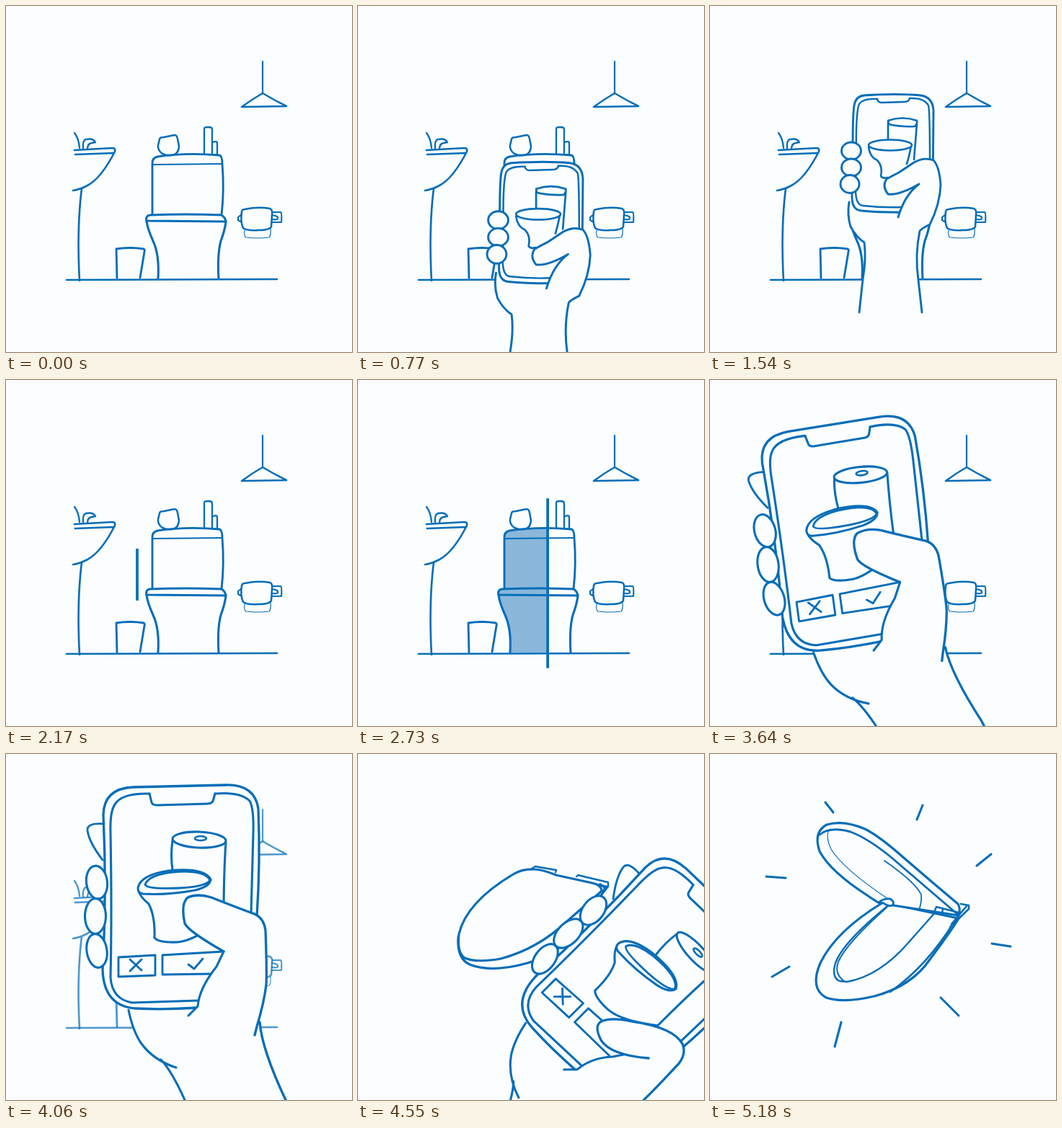
An HTML page with a canvas for the animation above (5.81 s loop, 480 by 480 pixels).

```html
<!DOCTYPE html>
<html lang="en">
<head>
<meta charset="utf-8">
<title>Bathroom scan</title>
<style>
html, body { margin: 0; width: 100%; height: 100%; overflow: hidden; background: #fcfdff; }
canvas { display: block; width: 100vw; height: 100vh; }
</style>
</head>
<body>
<canvas id="stage" width="480" height="480"></canvas>
<script>
const ctx = document.getElementById('stage').getContext('2d');
const PAPER = '#fcfdff', INK = '#046db8', TINT = '#8ab7da';
const STEP = 70, STEPS = 83, WEIGHT = 1.1;

const clamp = v => Math.min(1, Math.max(0, v));
const span = (n, a, b) => clamp((n - a) / (b - a));
const easeOut = k => 1 - (1 - k) ** 2;
const smooth = k => k * k * (3 - 2 * k);
const lerp = (a, b, k) => a + (b - a) * k;
const mix = (a, b, k) => a.map((v, i) => lerp(v, b[i], k));

function line(d, width = 2.6) {
  ctx.lineWidth = width * WEIGHT;
  ctx.stroke(new Path2D(d));
}
function area(d, color = PAPER) {
  ctx.fillStyle = color;
  ctx.fill(new Path2D(d));
}
function shape(d, width) {
  area(d);
  line(d, width);
}
function oval(x, y, rx, ry, turn = 0, width = 2.6) {
  ctx.beginPath();
  ctx.ellipse(x, y, rx, ry, turn, 0, 7);
  ctx.fillStyle = PAPER;
  ctx.fill();
  ctx.lineWidth = width * WEIGHT;
  ctx.stroke();
}
// Start point followed by quadratic segments.
function quads(p) {
  let d = `M${p[0]} ${p[1]}`;
  for (let i = 2; i < p.length; i += 4) d += `Q${p.slice(i, i + 4).join(' ')}`;
  return d;
}
function turnAbout(x, y, deg) {
  ctx.translate(x, y);
  ctx.rotate(deg * Math.PI / 180);
  ctx.translate(-x, -y);
}
function layer(draw) {
  ctx.save();
  draw();
  ctx.restore();
}

const TANK = 'M203 289V220Q202 211 210 209Q250 203 296 207Q300 208 300 219Q303 255 299 290';
const RIM = 'M200 290Q250 288 299 290Q304 293 305 299L195 298Q193 291 200 290Z';
const BOWL_LEFT = 'M195 298Q196 308 204 326Q213 345 211 378';
const BOWL_RIGHT = '295 378Q293 345 298 326Q304 310 305 299';

function toiletTint(x) {
  layer(() => {
    ctx.beginPath();
    ctx.rect(0, 0, x, 480);
    ctx.clip();
    [TANK, RIM, BOWL_LEFT + 'L' + BOWL_RIGHT].forEach(d => area(d, TINT));
  });
}

function bathroom(tintX) {
  if (tintX) toiletTint(tintX);
  // lamp
  line('M356 77V121', 2);
  line('M356 121Q342 129 327 140L389 139Q371 130 356 121Z', 2.3);
  // basin
  line('M95 176Q101 184 102 197M107 198Q106 186 111 185Q121 183 124 189L119 190Q113 191 113 198', 2.1);
  line('M95 200L148 197Q152 197 151 202Q132 239 113 249Q104 254 93 256M96 206L149 204M105 253Q98 310 102 381', 2.4);
  // bin and floor
  line('M154 378L153 337Q172 334 191 337Q193 338 192 341L186 377');
  line('M84 380L376 379', 2.4);
  // toilet
  line(TANK);
  line('M204 220L299 219', 2);
  line(RIM, 2.8);
  line(BOWL_LEFT + 'M' + BOWL_RIGHT, 2.8);
  // things on the tank
  line('M213 185Q213 182 219 182L234 179Q237 179 238 184L240 195Q239 204 234 206Q226 209 217 205Q210 200 211 193Z', 2.3);
  line('M275 206V170Q275 168 281 168Q286 168 286 171V206M287 189Q293 187 293 190V206', 2.1);
  // paper roll
  line('M331 282Q350 278 366 281Q370 282 369 290L368 306Q366 311 350 311Q334 312 329 308Q325 300 327 285Q328 282 331 282Z', 2.3);
  line('M327 289L322 293V297L327 300M370 286H381Q383 287 382 300H369M369 290Q378 291 377 295Q376 297 369 296', 2);
  line('M331 311Q330 320 333 321Q350 323 365 321Q368 318 367 309', 1.1);
}

function smallHand() {
  area('M193 272Q190 290 195 306Q203 321 214 328Q217 350 212 379L207 425H294L289 380Q284 345 291 312L305 303L310 250Z');
  line('M193 272Q190 290 195 306Q203 321 214 328Q217 350 212 379L207 425');
  shape('M214 124Q260 121 292 124Q309 126 310 145L309 260Q307 284 285 286Q240 287 210 284Q197 283 197 265L198 200Q198 150 200 138Q202 125 214 124Z');
  line('M232 129Q212 128 207 136Q204 142 203 170L202 255Q202 276 212 277Q240 280 266 279M277 128Q297 127 303 138Q305 145 305 215', 2.2);
  line('M232 129Q233 134 238 134L270 133Q276 133 277 128', 2.2);
  // toilet on the screen
  line('M247 159Q267 152 287 159Q288 163 284 167Q265 168 248 164ZM247 162V186M287 163L283 213', 2.4);
  line('M220 196Q222 210 232 214Q240 222 237 236Q240 240 246 238M279 194Q276 210 273 219', 2.4);
  oval(250, 193, 30, 7.5, 0, 2.4);
  oval(196, 201, 13.5, 12);
  oval(196, 224, 13.5, 12);
  oval(194, 247, 13, 12.5);
  const thumb = 'M290 247Q262 263 247 261Q238 250 245 240Q252 236 262 231L283 217Q297 209 310 214Q318 222 320 248Q319 275 305 303Q293 309 291 312';
  area(thumb + 'L261 293Q270 262 290 247Z');
  line(thumb + 'Q284 345 289 380L294 425M290 247Q270 262 261 293');
}

const THUMB_UP = [302, 274, 253, 246, 248, 235, 242, 208, 252, 199, 266, 193, 285, 199, 320, 213, 345, 222, 358, 228, 360, 245];
const THUMB_TAP = [325, 269, 285, 303, 261, 298, 236, 290, 244, 276, 250, 264, 273, 249, 320, 214, 345, 222, 358, 228, 360, 245];

function bigHand(tap) {
  // palm, arm and index finger behind the phone
  area('M170 340V355Q176 385 188 402Q205 425 236 435L248 480L340 800H500L388 480Q355 410 352 372L361 320L340 240Z');
  line('M170 355Q176 385 188 402Q205 425 236 435M215 424Q230 440 248 480L340 800', 2.8);
  shape('M137 97Q112 95 113 106Q115 122 134 147', 2.6);
  // phone
  shape('M176 46L305 43Q345 42 350 76Q353 150 348 225L345 310Q340 352 265 352Q220 355 180 353Q136 350 134 300Q140 190 135 84Q136 48 176 46Z', 3);
  line('M199 55Q160 54 151 70Q144 80 145 110Q147 220 145 310Q147 340 175 345L267 342M290 55Q325 52 338 65Q344 75 343 110L340 222', 2.8);
  line('M199 55L202 67Q203 71 210 71L280 69Q287 69 288 62L290 55', 2.8);
  // toilet on the screen
  line('M231 120Q228 140 231 161M305 122Q302 165 302 228', 2.8);
  oval(268, 119, 37, 11, 0.04, 2.8);
  oval(270, 117, 8, 3, 0, 2.4);
  line('M184 190Q186 198 198 208Q207 225 206 255Q212 262 238 261Q262 259 302 228', 2.8);
  shape('M183 186Q186 168 225 162Q275 157 284 174Q283 184 262 189Q225 196 190 194Q183 193 183 186Z', 2.8);
  line('M193 181Q198 168 230 164Q275 160 283 175Q278 184 240 186Q195 188 193 181Z', 2.6);
  // buttons
  line('M156 282L207 279V307L156 309ZM172 285L188 300M188 285L172 301', 2.6);
  line('M302 274L217 279V306L284 305M253 292L261 298L273 284', 2.6);
  oval(126, 178, 14.5, 23, -0.12, 2.8);
  oval(124, 225, 14.5, 24.5, 0, 2.8);
  oval(126, 273, 14, 23.5, -0.15, 2.8);
  // thumb
  const thumb = quads(mix(THUMB_UP, THUMB_TAP, tap)) + 'Q362 300 361 320';
  const [x, y, u, v] = mix([302, 274, 292, 295], [297, 290, 288, 303], tap);
  area(thumb + `Q356 355 345 388L253 363L266 350Q268 325 ${u} ${v}L${x} ${y}Z`);
  line(thumb + 'Q358 345 348 378L345 390M352 372Q355 410 388 480L500 800', 3);
  line(`M${x} ${y}L${u} ${v}Q268 325 266 350L253 363`, 2.8);
}

const LID_SHUT = [245, 204, 228, 203, 215, 211, 150, 250, 140, 294, 137, 319, 148, 327, 165, 334, 198, 328, 250, 314, 290, 276, 314, 255, 338, 234, 338, 226, 325, 223];
const LID_OPEN = [235, 207, 225, 201, 218, 196, 167, 163, 152, 135, 143, 108, 162, 98, 185, 91, 215, 104, 235, 114, 270, 145, 307, 177, 344, 208, 348, 215, 345, 224];
const SEAT_SHUT = [240, 206, 160, 245, 139, 298, 137, 328, 155, 336, 185, 348, 235, 334, 280, 322, 305, 285, 335, 245, 345, 228];
const SEAT_OPEN = [240, 206, 175, 245, 153, 290, 138, 325, 161, 338, 185, 346, 228, 336, 280, 322, 305, 285, 335, 245, 345, 228];

function seat(open) {
  const shut = open < 0.5;
  shape(quads(mix(SEAT_SHUT, SEAT_OPEN, open)) + 'Z', 2.9);
  if (open > 0) {
    line('M250 208Q185 260 174 290Q168 310 180 315L190 316Q235 308 275 262L313 219', 2.2);
    line('M245 213Q190 262 178 288Q172 305 186 315', 1.8);
    line('M338 234Q300 295 250 330M333 240L359 215V210L348 208M335 236L356 211', 2.4);
  }
  const lid = quads(mix(LID_SHUT, LID_OPEN, open));
  area(lid + 'Z');
  line(lid + (shut ? 'L275 212Q255 204 245 204' : 'L248 209'), 2.9);
  if (shut) {
    line('M241 203L246 200L275 205L274 208M303 214L305 212L347 222V228L339 238M336 224L342 230L338 239', 2.2);
  } else {
    layer(() => {
      ctx.globalAlpha = span(open, 0.6, 1);
      line('M152 112Q166 100 195 108Q219 117 251 143L343 222', 2.6);
      line('M165 105Q160 115 168 132Q185 160 250 203', 1.1);
      line('M242 148Q285 178 293 195Q294 205 290 216', 1.6);
    });
    shape('M234 206Q240 200 250 201Q257 205 253 210Q247 212 241 207Z', 2.6);
    line('M310 222L314 212L345 220L343 230M323 214L322 222', 2.2);
  }
}

const RAYS = [
  [171, 81, 160, 67], [287, 91, 295, 71], [370, 155, 390, 139], [391, 263, 417, 267],
  [320, 338, 345, 363], [182, 372, 173, 406], [110, 295, 86, 309], [105, 172, 78, 170]
];

function rays(k) {
  const out = 0.75 + 0.25 * k + 0.16 * Math.sin(Math.PI * k);
  ctx.translate(250, 215);
  ctx.scale(out, out);
  ctx.translate(-250, -215);
  for (const [x, y, u, v] of RAYS) line(`M${x} ${y}L${lerp(x, u, k)} ${lerp(y, v, k)}`, 2.8);
}

function scanner(u, x) {
  const arch = Math.sin(Math.PI * u) ** 0.8;
  const h = lerp(lerp(72, 49, u), 236, arch), mid = lerp(lerp(270, 283.5, u), 282, arch);
  line(`M${x} ${mid - h / 2}V${mid + h / 2}`, lerp(3.4, 1.3, span(u, 0.6, 1)));
}

function draw(n) {
  ctx.globalAlpha = 1;
  ctx.fillStyle = PAPER;
  ctx.fillRect(0, 0, 480, 480);
  ctx.strokeStyle = INK;
  ctx.lineCap = ctx.lineJoin = 'round';

  const u = span(n, 31, 48);
  const x = 182 + 132 * (1 - (1 - u) ** 1.5);
  const fade = n < 58 ? 1 : Math.max(0, 0.7 - 0.3 * (n - 58));
  if (fade > 0) layer(() => {
    ctx.globalAlpha = fade;
    bathroom(n < 31 ? 0 : x);
  });
  if (n >= 31 && n <= 48) layer(() => {
    ctx.lineCap = 'butt';
    scanner(u, x);
  });

  if (n >= 9 && n < 30) layer(() => {
    const low = n < 22 ? 1 - easeOut(span(n, 8, 14)) : span(n, 22, 30) ** 2;
    ctx.translate(245, 360 * low);
    ctx.scale(1 + 0.12 * low, 1 + 0.12 * low);
    ctx.translate(-245, 0);
    smallHand();
  });

  if (n >= 60) layer(() => {
    const open = smooth(span(n, 67, 72));
    ctx.translate(0, -44 * (1 - open));
    seat(open);
  });
  if (n >= 70) layer(() => rays(span(n, 69, 74)));

  if (n >= 49 && n < 73) layer(() => {
    const leave = span(n, 66, 72) ** 2;
    ctx.translate(420 * leave, 170 * leave);
    turnAbout(179, 440, 46.2 * easeOut(span(n, 60, 66)) + 20 * leave);
    turnAbout(330, 560, -70 * (1 - easeOut(span(n, 48, 54))));
    bigHand(smooth(span(n, 58, 61)));
  });
}

const start = performance.now();
function tick() {
  draw(Math.floor((performance.now() - start) / STEP) % STEPS);
  requestAnimationFrame(tick);
}
tick();
</script>
</body>
</html>
```
